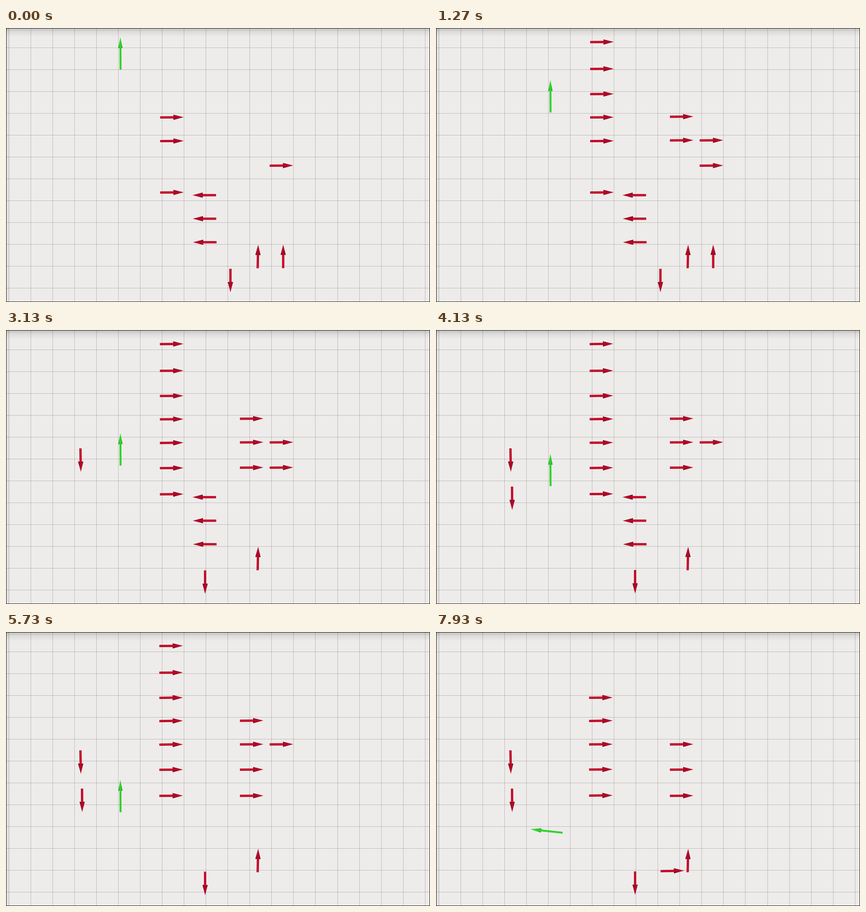
These frames come from a looping animation (930x602 px, 8000 ms). An HTML page:

```html
<!DOCTYPE html>
<html lang="en">
<head>
<meta charset="utf-8">
<title>Arrows on a grid</title>
<style>
  html, body { margin: 0; width: 100%; height: 100%; overflow: hidden; background: #edecea; }
  svg { display: block; width: 930px; height: 602px; }
</style>
</head>
<body>
<svg viewBox="0 0 930 602">
  <defs>
    <linearGradient id="redHead" x2="0" y2="1">
      <stop offset="0" stop-color="#70081c"/>
      <stop offset=".4" stop-color="#bd0629"/>
      <stop offset=".65" stop-color="#b00526"/>
      <stop offset="1" stop-color="#650618"/>
    </linearGradient>
    <linearGradient id="greenHead" x2="0" y2="1">
      <stop offset="0" stop-color="#1f9a1c"/>
      <stop offset=".45" stop-color="#2fe32a"/>
      <stop offset="1" stop-color="#1f9a1c"/>
    </linearGradient>
    <linearGradient id="topShade" x2="0" y2="1">
      <stop offset="0" stop-color="#000" stop-opacity=".22"/>
      <stop offset=".4" stop-color="#000" stop-opacity=".07"/>
      <stop offset="1" stop-color="#000" stop-opacity="0"/>
    </linearGradient>
    <linearGradient id="sideShade">
      <stop offset="0" stop-color="#000" stop-opacity=".09"/>
      <stop offset="1" stop-color="#000" stop-opacity="0"/>
    </linearGradient>
    <g id="redArrow">
      <path d="M0-2.5H30V2.5H0z" fill="#a00a26"/>
      <path d="M0-1.7H30V1.4H0z" fill="#d4032c"/>
      <path d="M29-5.8L51.5 0L29 5.8z" fill="url(#redHead)"/>
    </g>
    <g id="greenArrow">
      <path d="M0-2H49V2H0z" fill="#25b422"/>
      <path d="M0-1.4H49V1.2H0z" fill="#2cdf28"/>
      <path d="M47-4.8L71 0L47 4.8z" fill="url(#greenHead)"/>
    </g>
  </defs>
  <rect width="930" height="602" fill="#edecea"/>
  <path id="grid" stroke="#000" stroke-opacity=".2" fill="none"/>
  <rect width="930" height="20" fill="url(#topShade)"/>
  <rect width="9" height="602" fill="url(#sideShade)"/>
  <g id="arrows"></g>
  <rect x=".5" y=".5" width="929" height="601" fill="none" stroke="#1c1c1c"/>
</svg>
<script>
const LOOP = 8000, STEP = 200 / 3, CELL = 48.05;
const RIGHT = 0, DOWN = 90, LEFT = 180, UP = -90;
const layer = document.getElementById('arrows');

let lines = '';
for (let i = 0; i < 20; i++) lines += `M${Math.floor(6.3 + CELL * i) + .5} 0V602`;
for (let i = 0; i < 12; i++) lines += `M0 ${Math.floor(43.3 + CELL * i) + .5}H930`;
document.getElementById('grid').setAttribute('d', lines);

function addArrow(id) {
  const el = document.createElementNS('http://www.w3.org/2000/svg', 'use');
  el.setAttribute('href', '#' + id);
  return layer.appendChild(el);
}

function place(el, x, y, angle) {
  el.setAttribute('transform', `translate(${x} ${y}) rotate(${angle})`);
}

// x, y is the tail; drift is the sideways shift at each new estimate
const reds = [];
function red(angle, x, y, { from = 0, to = LOOP, drift = null } = {}) {
  reds.push({ el: addArrow('redArrow'), angle, x, y, from, to, drift });
}

// Columns of arrows share the same rows
const rows = [31, 90, 145.3, 196.5, 248.5, 304, 361.5];
function column(x, shiftY, firstRow, births, deaths, drift) {
  births.forEach((from, i) =>
    red(RIGHT - .6, x, rows[firstRow + i] + shiftY, { from, to: deaths[i], drift }));
}
column(338.3, 0, 0, [530, 330, 130, 0, 0, 1600, 0], [6330, 6600], -.6);
column(513, -1.5, 3, [330, 670, 3070, 5470], [6530]);
column(578.5, -1.5, 4, [1070, 0], [7400, 3800]);

for (let i = 0; i < 3; i++) red(LEFT, 460.5 + i * .6, 367.3 + i * 51.7, { to: 4870 + i * 300 });

red(UP + 1.2, 552, 527.8);
red(UP, 608, 527.5, { to: 1530 });
red(DOWN, 492.3, 529, { to: 2400 });
red(DOWN, 436.7, 529, { from: 2400, drift: 0 });
red(RIGHT - 1.4, 492.7, 525.5, { from: 6530 });
red(DOWN - 1, 163.3, 260, { from: 3000 });
red(DOWN - .4, 166.8, 344, { from: 3800 });

// Green tail height every 2 s, with one extra point at each end for the spline
const heights = [-52, 91.3, 235, 337.5, 403, 441.8, 443];
const TURN_START = 6070, TURN_TIME = 1860;
const green = addArrow('greenArrow');

function spline(points, pos) {
  const i = Math.floor(pos), u = pos - i;
  const [a, b, c, d] = points.slice(i, i + 4);
  return b + u / 2 * (c - a + u * (2 * a - 5 * b + 4 * c - d + u * (3 * (b - c) + d - a)));
}

function draw(now) {
  const t = Math.floor((now % LOOP) / STEP + .1) * STEP % LOOP;
  const estimate = Math.min(4, Math.floor(t / 1600));

  for (const { el, angle, x, y, from, to, drift } of reds) {
    el.style.display = t >= from && t < to ? '' : 'none';
    const moves = drift === null ? 0 : estimate;
    place(el, x + moves * drift, y - moves * y / 700, angle);
  }

  const turn = Math.max(0, (t - TURN_START) / TURN_TIME);
  place(green, 251.3 + 26 * turn ** 2.5, spline(heights, t / 2000), UP - .4 - 83 * turn ** 1.6);
}

const start = performance.now();
function frame() {
  draw(performance.now() - start);
  requestAnimationFrame(frame);
}
frame();
</script>
</body>
</html>
```
